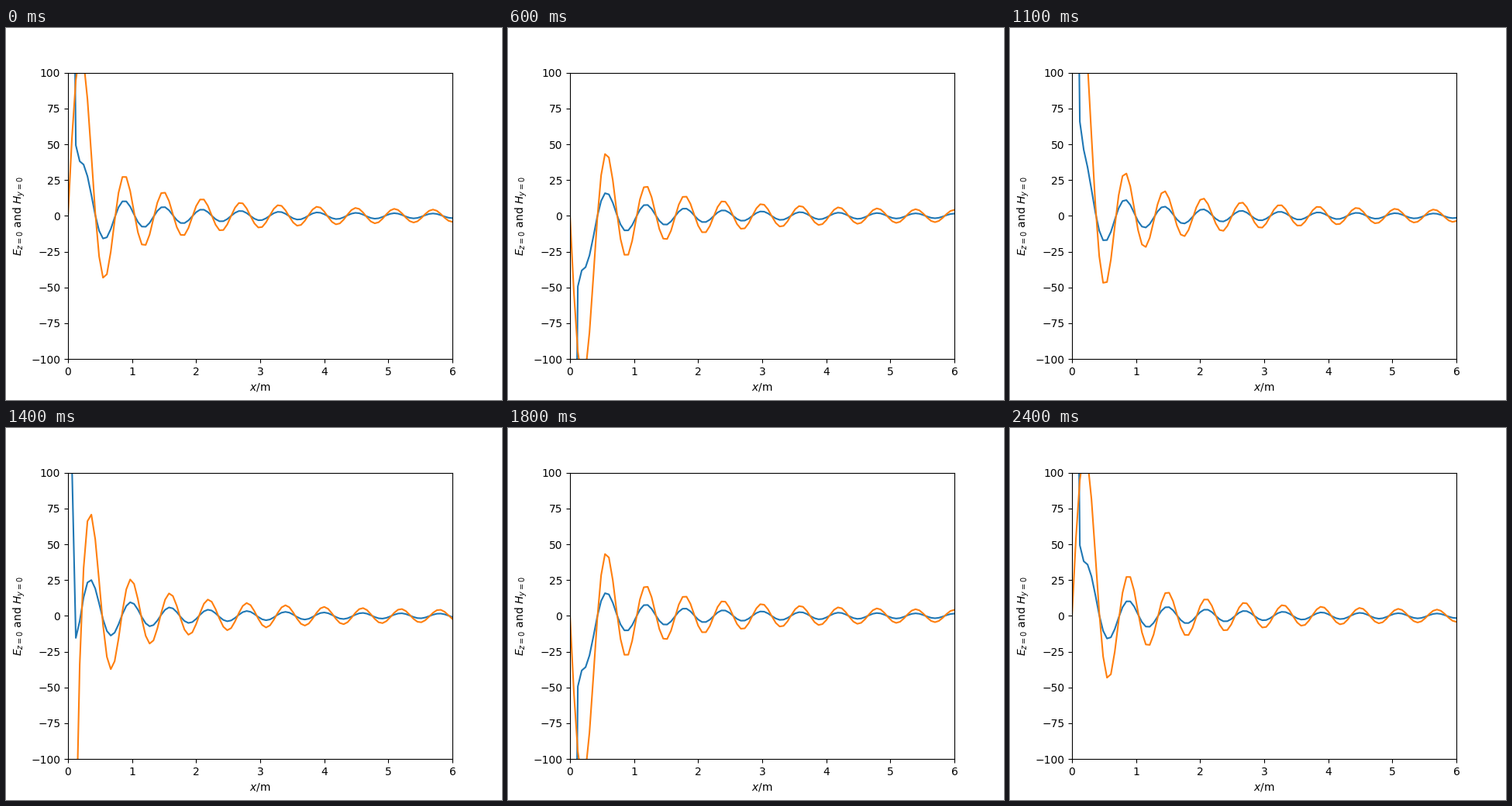
These frames come from a looping animation (640 px wide and 480 px high, 2.5 s). A matplotlib script:

```python
import numpy as np
import matplotlib.pyplot as plt
from matplotlib.animation import FuncAnimation

FRAMES = 25
STEPS_PER_PERIOD = 12
WAVELENGTH = 0.6
H_AMP = 25.1
E_AMP = 0.377 * H_AMP  # free-space impedance, in kilo-ohms

k = 2 * np.pi / WAVELENGTH
x = np.linspace(1e-3, 6, 100)
kx = k * x


def dipole_fields(phase):
    """Near and far field of an oscillating dipole, along the x axis."""
    wave = np.exp(1j * (kx - phase)) / x
    e = -E_AMP * ((1 + 1j / kx - 1 / kx**2) * wave).real
    h = -H_AMP * ((1 + 1j / kx) * wave).real
    return e, h


fig, ax = plt.subplots(figsize=(6.4, 4.8), dpi=100)
ax.set(xlim=(0, 6), ylim=(-100, 100),
       xlabel="$x$/m", ylabel="$E_{z=0}$ and $H_{y=0}$")
e_line, = ax.plot([], [], color="tab:blue")
h_line, = ax.plot([], [], color="tab:orange")


def update(i):
    e, h = dipole_fields(2 * np.pi * i / STEPS_PER_PERIOD)
    e_line.set_data(x, e)
    h_line.set_data(x, h)
    return e_line, h_line


anim = FuncAnimation(fig, update, frames=FRAMES, interval=100, repeat=True,
                     repeat_delay=0)
plt.show()
```
